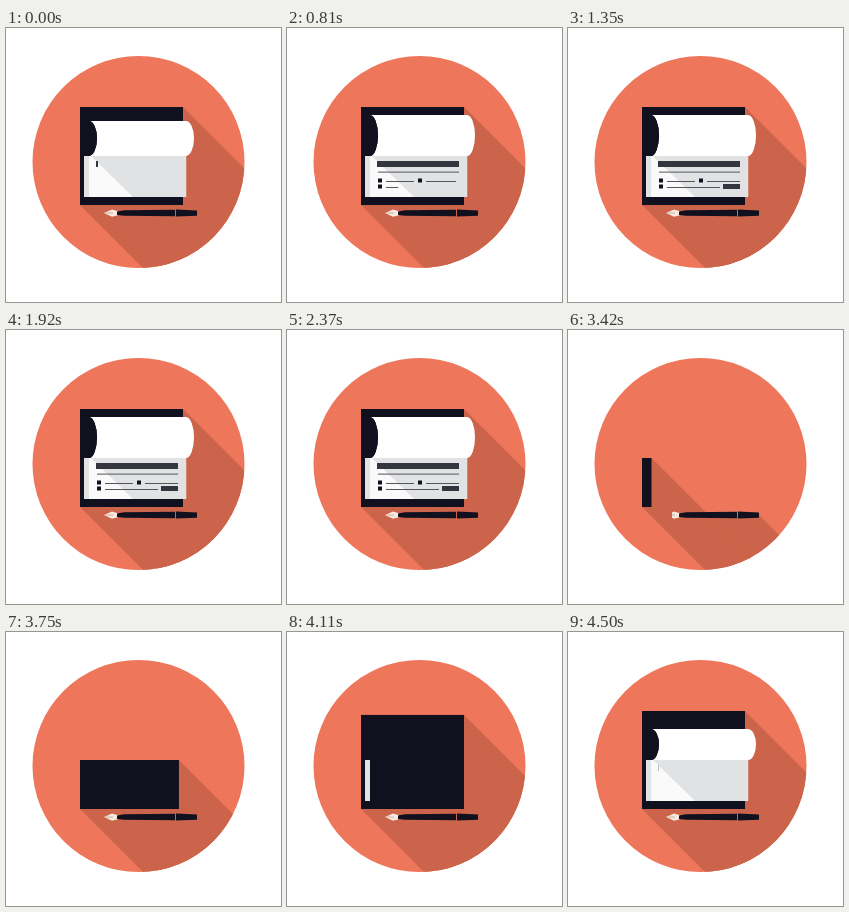
Animation of 275 by 274 pixels, one loop 4530 ms. Source, as an HTML page with a canvas:

```html
<!DOCTYPE html>
<html lang="en">
<head>
<meta charset="utf-8">
<title>Chequebook</title>
<style>
  html, body { margin: 0; height: 100%; overflow: hidden; background: #fff; }
  canvas { display: block; }
</style>
</head>
<body>
<canvas id="stage" width="275" height="274"></canvas>
<script>
const ctx = document.getElementById('stage').getContext('2d');
const LOOP = 4530, STEP = 30, RESET = 2590;
const INK = '#10101f', DISC = '#ee765a', SHADE = '#cb644a';

const progress = (t, start, end) => Math.min(1, Math.max(0, (t - start) / (end - start)));
const mix = (a, b, p) => a + (b - a) * p;

function rect(x, y, w, h, color) {
  ctx.fillStyle = color;
  ctx.fillRect(x, y, w, h);
}

function shape(d, color) {
  ctx.fillStyle = color;
  ctx.fill(new Path2D(d));
}

// Draws only what lies between x0 and x1.
function reveal(x0, x1, draw) {
  if (x1 <= x0) return;
  ctx.save();
  ctx.beginPath();
  ctx.rect(x0, 0, x1 - x0, 274);
  ctx.clip();
  draw();
  ctx.restore();
}

function longShadow(x0, y0, x1, y1) {
  const d = 200;
  shape(`M${x0} ${y1}V${y0}H${x1}l${d} ${d}L${x0 + d} ${y1 + d}Z`, SHADE);
}

function drawPen() {
  shape('M98 185L106 181.5L112 183.3V187.2L106 188.8Z', '#f8e9de');
  rect(100, 184.7, 7, .7, '#b79a8c');
  shape('M111 183.4L118 182.2L169 181.7V188.3L118 187.8L111 187Z', INK);
  shape('M170 181.4L191 182.4V187.8L170 188.6Z', INK);
}

function drawSheet() {
  rect(78, 128, 102.5, 41, '#e1e2e3');
  shape('M83 128H85L127 169H83Z', '#fafafa');
}

function drawRoll(top) {
  const ry = (128 - top) / 2;
  shape(`M83 ${top}A8 ${ry} 0 0 1 83 128H180A8 ${ry} 0 0 0 180 ${top}Z`, '#fff');
  shape(`M78 ${top}H83A8 ${ry} 0 0 1 83 128H78Z`, INK);
}

function drawText(t) {
  const rows = [
    [4480, 4800, 2, () => rect(90, 133, 82, 6, '#34353f')],
    [4800, 5080, 1, () => rect(91, 143.6, 81, 1, '#55565c')],
    [5080, 5350, 1, () => {
      rect(91, 150.5, 4, 4, INK);
      rect(99, 153, 28, 1, '#55565c');
      rect(131, 150.5, 4, 4, INK);
      rect(139, 153, 33, 1, '#55565c');
    }],
    [5270, 5540, 1, () => {
      rect(91, 156.5, 4, 4, INK);
      rect(99, 159, 53, 1, '#55565c');
      rect(155, 156, 17, 5, '#34353f');
    }],
  ];
  for (const [start, end, power, draw] of rows) {
    reveal(90, mix(90, 172, progress(t, start, end) ** power), draw);
  }
}

function render(time) {
  let t = Math.floor(time % LOOP / STEP) * STEP;
  if (t < RESET) t += LOOP;

  const penX = mix(191, 98, progress(t, RESET, 3477));
  const bookRight = mix(74, 177, progress(t, 3385, 3765));
  const bookTop = mix(128, 79, progress(t, 3765, 4140));
  const sheetRight = mix(78, 180.5, progress(t, 4102, 4267));
  const rollTop = mix(128, 87, progress(t, 4267, 4575));

  rect(0, 0, 275, 274, '#fff');
  ctx.save();
  ctx.beginPath();
  ctx.arc(132.5, 134, 106, 0, 2 * Math.PI);
  ctx.fillStyle = DISC;
  ctx.fill();
  ctx.clip();
  if (penX < 191) longShadow(penX, penX < 111 ? 185 : 182, 191, penX < 111 ? 186 : 188);
  if (bookRight > 74) longShadow(74, bookTop, bookRight, 177);
  ctx.restore();

  rect(74, bookTop, bookRight - 74, 177 - bookTop, INK);
  reveal(penX, 192, drawPen);
  reveal(78, sheetRight, drawSheet);
  if (rollTop < 128) drawRoll(rollTop);
  drawText(t);
}

function tick() {
  render(performance.now());
  requestAnimationFrame(tick);
}
tick();
</script>
</body>
</html>
```
